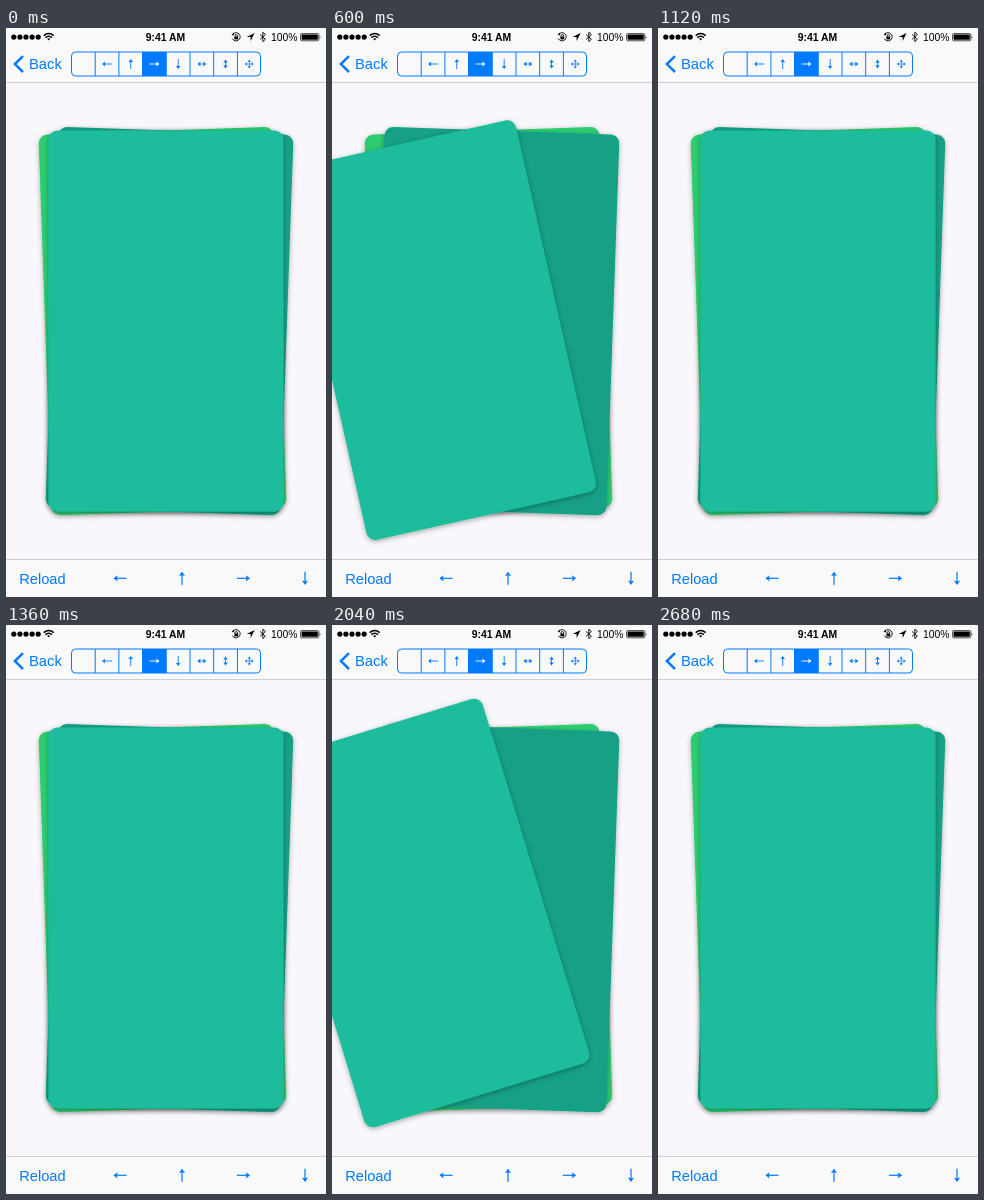
Animation of 320 by 569 pixels, one loop 2.72 s. Source, as an HTML page:

```html
<!DOCTYPE html>
<html lang="en">
<head>
<meta charset="utf-8">
<title>Swipeable cards</title>
<style>
html, body { margin: 0; width: 100%; height: 100%; overflow: hidden; background: #f9f7fb; }
svg { display: block; width: 100%; height: 100%; }
text { font-family: "Liberation Sans", Arial, sans-serif; }
.blue { fill: #007aff; }
.line { fill: none; stroke: #007aff; }
</style>
</head>
<body>
<svg viewBox="0 0 320 569" xmlns="http://www.w3.org/2000/svg">
  <defs>
    <filter id="shadow" x="-10%" y="-10%" width="120%" height="120%">
      <feDropShadow dx="0" dy="1.5" stdDeviation="2.4" flood-color="#000" flood-opacity=".33"/>
    </filter>
    <rect id="card" x="-117.5" y="-190.5" width="235" height="381" rx="9"/>
  </defs>

  <rect width="320" height="569" fill="#f9f7fb"/>

  <g filter="url(#shadow)"><use href="#card" fill="#2ecc71" transform="rotate(-2 160 393) translate(160 293)"/></g>
  <g filter="url(#shadow)"><use href="#card" fill="#16a085" transform="rotate(2 160 393) translate(160 293)"/></g>
  <g filter="url(#shadow)"><use id="front" href="#card" fill="#1abc9c"/></g>

  <!-- status and navigation bar -->
  <rect width="320" height="54" fill="#f9f9fa"/>
  <rect y="54" width="320" height=".6" fill="#b2b2b4"/>
  <g id="dots"></g>
  <g fill="none" stroke="#000" stroke-width="1.5">
    <path d="M37.7 7.6Q42.7 3.4 47.7 7.6M39.4 9.6Q42.7 6.9 46 9.6"/>
    <path d="M41.1 10.8Q42.7 9.7 44.3 10.8L42.7 12.6Z" fill="#000" stroke="none"/>
  </g>
  <text x="159.5" y="12.8" font-size="10.4" font-weight="bold" text-anchor="middle">9:41 AM</text>
  <g fill="none" stroke="#000" stroke-width=".9">
    <path d="M227 6.1A4.1 4.1 0 1 1 226.4 10.6"/>
    <path d="M229 8.7V7.9a1.3 1.3 0 0 1 2.6 0V8.7"/>
    <path d="M225.6 6.9L228.2 7.2L227.7 4.6Z" fill="#000" stroke="none"/>
    <rect x="228.4" y="8.5" width="3.8" height="2.9" fill="#000" stroke="none"/>
    <path d="M248.6 5L240.7 9H244.6V12.9Z" fill="#000" stroke="none"/>
    <path d="M254 6.4L259.4 11.3L256.8 13.6V4.2L259.4 6.5L254 11.4"/>
    <rect x="294.6" y="5.6" width="18.2" height="7.2" rx="1.2" stroke-width=".7"/>
    <rect x="295.6" y="6.6" width="16.2" height="5.2" rx=".5" fill="#000" stroke="none"/>
    <path d="M313.7 7.7Q315.3 9.2 313.7 10.7Z" fill="#000" stroke="none"/>
  </g>
  <text x="265" y="12.8" font-size="10.4">100%</text>
  <path class="line" d="M17 28.2L8.9 36.1L17 44" stroke-width="2.5"/>
  <text class="blue" x="23" y="41" font-size="14.8">Back</text>

  <rect x="136" y="24" width="24" height="24" class="blue"/>
  <rect class="line" x="65.5" y="24" width="189" height="24" rx="4"/>
  <path id="dividers" class="line"/>
  <g id="segments"></g>

  <!-- toolbar -->
  <rect y="531" width="320" height="38" fill="#f9f9fa"/>
  <rect y="531" width="320" height=".6" fill="#b2b2b4"/>
  <text class="blue" x="13.3" y="555.5" font-size="14.6">Reload</text>
  <g id="tools"></g>
</svg>
<script>
const $ = id => document.getElementById(id);
const LOOP = 2720, STEP = 40;

// One arrow centred on x, y; ends lists the angles that carry a head.
function arrow(x, y, half, head, ends, color = "#007aff", width = 1) {
  return ends.map(a => `<g transform="translate(${x} ${y}) rotate(${a})" fill="${color}">
    <rect x="${ends.length > 1 ? 0 : -half}" y="${-width / 2}" width="${ends.length > 1 ? half - 1 : 2 * half - 1}" height="${width}"/>
    <path d="M${half} 0L${half - head} ${-head * 0.72}L${half - head * 0.8} 0L${half - head} ${head * 0.72}Z"/></g>`).join("");
}

const segX = i => 65.5 + (i + 0.5) * 23.7;
const small = [[180], [-90], [0], [90], [0, 180], [90, -90], [0, 90, 180, 270]];
$("segments").innerHTML = small.map((ends, i) =>
  arrow(segX(i + 1), 36, ends.length > 1 ? 4.5 : 5, ends.length > 2 ? 2.4 : 3.3, ends,
    i === 2 ? "#fff" : "#007aff", ends.length > 2 ? 0.7 : 0.9)).join("");
$("dividers").setAttribute("d",
  [1, 2, 3, 4, 5, 6, 7].map(i => `M${65.5 + i * 23.7} 24V48`).join(""));
$("tools").innerHTML = [[114, 180], [176, -90], [237.5, 0], [299, 90]]
  .map(([x, a]) => arrow(x, 550.3, 6.6, 4.3, [a], "#007aff", 1.2)).join("");
$("dots").innerHTML = [0, 1, 2, 3, 4]
  .map(i => `<circle cx="${7.8 + i * 6.1}" cy="9.1" r="2.6"/>`).join("");

// Drag poses: time, x offset, y offset, angle
const poses = [
  [0, 0, 0, 0], [350, 0, 0, 0], [400, 1, 4, -1], [540, -40, 8, -10],
  [660, -56, 10, -14], [800, -23.7, 11.5, -6.1], [940, 0, 0, 0],
  [1550, 0, 0, 0], [1600, 2.5, 6, -1.1], [1680, -26, 6, -8],
  [1860, -64, -2, -16], [2040, -68.5, -5, -17], [2140, -38, -2, -9.5],
  [2280, 0, 0, 0], [LOOP, 0, 0, 0]
];

const slope = (i, k) => (poses[i + 1][k] - poses[i][k]) / (poses[i + 1][0] - poses[i][0]);

// Tangent that never overshoots the poses
function tangent(i, k) {
  if (i === 0 || i === poses.length - 1) return 0;
  const a = slope(i - 1, k), b = slope(i, k);
  return a * b <= 0 ? 0 : 2 * a * b / (a + b);
}

function valueAt(t, k) {
  let i = 0;
  while (i < poses.length - 2 && t >= poses[i + 1][0]) i++;
  const [p, q] = [poses[i], poses[i + 1]];
  const d = q[0] - p[0], u = (t - p[0]) / d, v = 1 - u;
  return p[k] * (1 + 2 * u) * v * v + q[k] * u * u * (3 - 2 * u)
    + d * u * v * (tangent(i, k) * v - tangent(i + 1, k) * u);
}

function draw(time) {
  const t = Math.floor((time % LOOP) / STEP) * STEP;
  const [x, y, a] = [1, 2, 3].map(k => valueAt(t, k));
  $("front").setAttribute("transform", `translate(${160 + x} ${293 + y}) rotate(${a})`);
}

const start = performance.now();
function tick() {
  draw(performance.now() - start);
  requestAnimationFrame(tick);
}
tick();
</script>
</body>
</html>
```
